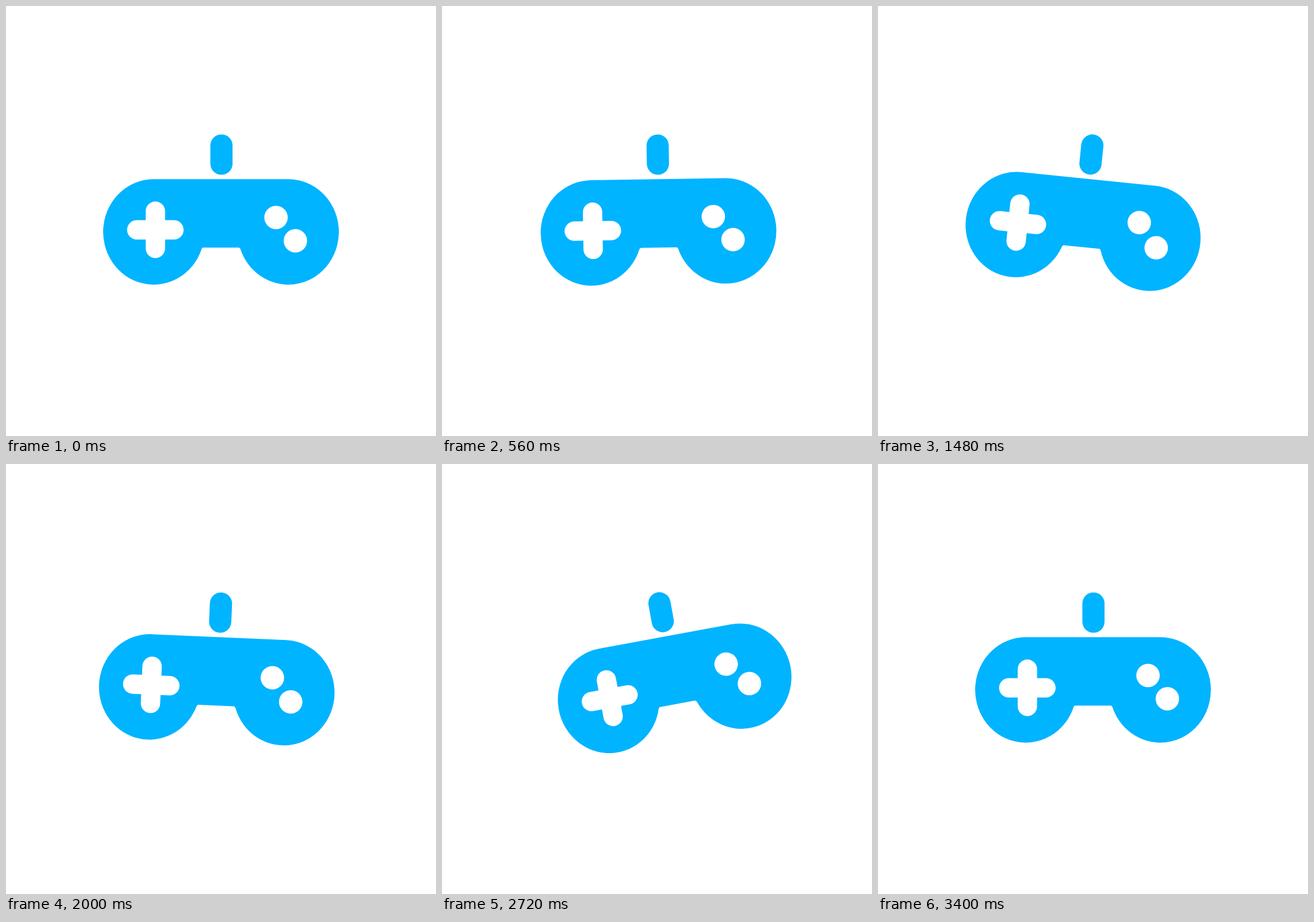
These frames come from a looping animation (748x748 px, 3.44 s). An HTML page:

```html
<!DOCTYPE html>
<html lang="en">
<head>
<meta charset="utf-8">
<title>Swinging gamepad</title>
<style>
  html, body { margin: 0; width: 100%; height: 100%; overflow: hidden; background: #fff; }
  svg { display: block; width: 100%; height: 100%; }
  .ink { fill: #00b4ff; }
  .hole { fill: #fff; }
</style>
</head>
<body>
<svg viewBox="0 0 748 748">
  <g id="pad">
    <rect class="ink" x="355.5" y="223.4" width="38.6" height="70.2" rx="19.3"/>
    <path class="ink" d="M257 301.3H491A88 91.7 0 1 1 408 423.5Q407 420.3 404.5 420.3H343.5Q341 420.3 340 423.5A88 91.7 0 1 1 257 301.3Z"/>
    <g class="hole">
      <rect x="243" y="340.1" width="33.7" height="98.4" rx="16.85"/>
      <rect x="210.6" y="372.5" width="98.4" height="33.7" rx="16.85"/>
      <circle cx="469.7" cy="367.8" r="20.4"/>
      <circle cx="503.4" cy="408.4" r="20.4"/>
    </g>
  </g>
</svg>
<script>
  const LOOP = 3440, STEP = 40;
  const PIVOT = "374.4 223.5";

  // Ends of each swing: [time in ms, angle in degrees]
  const turns = [
    [0, 0], [320, -10.1], [755, 5.75], [1140, 2.3], [1789, 8.9],
    [2340, -11.1], [2646, -11.1], [3120, 0], [LOOP, 0]
  ];

  const ease = u => (1 - Math.cos(Math.PI * u)) / 2;

  function angleAt(t) {
    const i = turns.findIndex(([end]) => t < end);
    const [t0, a0] = turns[i - 1], [t1, a1] = turns[i];
    return a0 + (a1 - a0) * ease((t - t0) / (t1 - t0));
  }

  const pad = document.getElementById("pad");
  const start = performance.now();

  function draw() {
    const t = (performance.now() - start) % LOOP;
    const angle = angleAt(Math.floor(t / STEP) * STEP);
    pad.setAttribute("transform", `rotate(${angle.toFixed(3)} ${PIVOT})`);
    requestAnimationFrame(draw);
  }
  draw();
</script>
</body>
</html>
```
